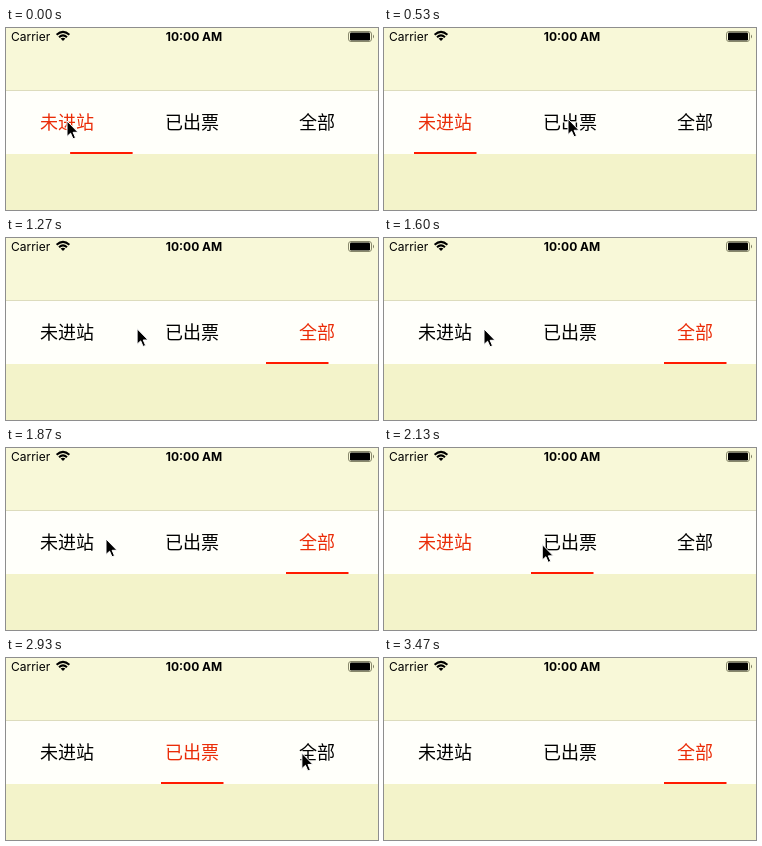
These frames come from a looping animation (372x182 px, 3540 ms). An HTML page:

```html
<!DOCTYPE html>
<html lang="zh-CN">
<head>
<meta charset="utf-8">
<style>
  html, body { margin: 0; width: 100%; height: 100%; overflow: hidden; background: #f3f3ca; }
  svg { display: block; }
  .status { font: 12px Inter, Roboto, sans-serif; }
  .tab { font: 18px "Noto Sans CJK SC", "Noto Sans CJK", sans-serif; text-anchor: middle; }
</style>
</head>
<body>
<svg width="372" height="182" viewBox="0 0 372 182">
  <rect width="372" height="62" fill="#f8f8d8"/>
  <rect y="62" width="372" height="1" fill="#dddcbd"/>
  <rect y="63" width="372" height="63" fill="#fffffa"/>

  <g class="status">
    <text x="5" y="12.5">Carrier</text>
    <text x="188" y="12.5" text-anchor="middle" font-weight="700">10:00 AM</text>
  </g>
  <g fill="none" stroke="#000" stroke-width="2">
    <path d="M50.6 6.7Q57 1 63.4 6.7M53 9.2Q57 5.6 61 9.2"/>
    <path d="M54.6 10.6Q57 8.7 59.4 10.6L57 13Z" fill="#000" stroke="none"/>
  </g>
  <rect x="342.5" y="3.5" width="23" height="10" rx="2.5" fill="none" stroke="#88886c"/>
  <rect x="344" y="4.5" width="20" height="8" rx="1.2"/>
  <path d="M367 6.5Q369 8.5 367 10.5Z" fill="#77775f"/>

  <g class="tab">
    <text y="100.5">未进站</text>
    <text y="100.5">已出票</text>
    <text y="100.5">全部</text>
  </g>
  <rect id="line" y="124" width="62.5" height="2" fill="#ff1a00"/>
  <path id="cursor" d="M0 0V15.5L3.6 12.2L6 17.8L8.5 16.7L6.1 11.3H11Z" stroke="#fff"/>
</svg>
<script>
const LOOP = 3540, FPS = 15, SLIDE = 250, GLIDE = 400, TAB_WIDTH = 125;
const labels = [...document.querySelectorAll('.tab text')];
const line = document.getElementById('line');
const cursor = document.getElementById('cursor');

// The pointer clicks a tab, then glides to the next stop and waits there
const stops = [
  { time: -192, tab: 0, x: 61, y: 93 },
  { time: 600, tab: 1, x: 184, y: 91 },
  { time: 1080, tab: 2, x: 305, y: 89 },
  { time: 2003, tab: 0, x: 100, y: 91 },
  { time: 2665, tab: 1, x: 184, y: 99 },
  { time: 3135, tab: 2, x: 300, y: 95 }
];
const exit = { x: 300, y: 200 };

const lerp = (a, b, p) => a + (b - a) * p;
const progress = (t, start, length) => Math.min(1, Math.max(0, (t - start) / length));
const easeInOut = p => p * p * (3 - 2 * p);
const easeOut = p => 1 - (1 - p) ** 3;

labels.forEach((label, i) => label.setAttribute('x', 61 + TAB_WIDTH * i));

function draw(now) {
  const t = Math.floor((now % LOOP + 5) * FPS / 1000) * 1000 / FPS;
  const i = stops.findLastIndex(s => s.time <= t);
  const stop = stops[i], next = stops[i + 1] ?? exit;
  const from = stops.at(i - 1).tab;

  const slide = easeInOut(progress(t, stop.time, SLIDE));
  const glide = easeOut(progress(t, Math.max(0, stop.time), GLIDE));

  labels.forEach((label, n) => label.setAttribute('fill', n === stop.tab ? '#ea2c08' : '#000'));
  line.setAttribute('x', 30 + TAB_WIDTH * lerp(from, stop.tab, slide));
  cursor.setAttribute('transform',
    `translate(${lerp(stop.x, next.x, glide)} ${lerp(stop.y, next.y, glide)})`);
}

let origin;
function tick(now) {
  origin ??= now;
  draw(now - origin);
  requestAnimationFrame(tick);
}
draw(0);
requestAnimationFrame(tick);
</script>
</body>
</html>
```
